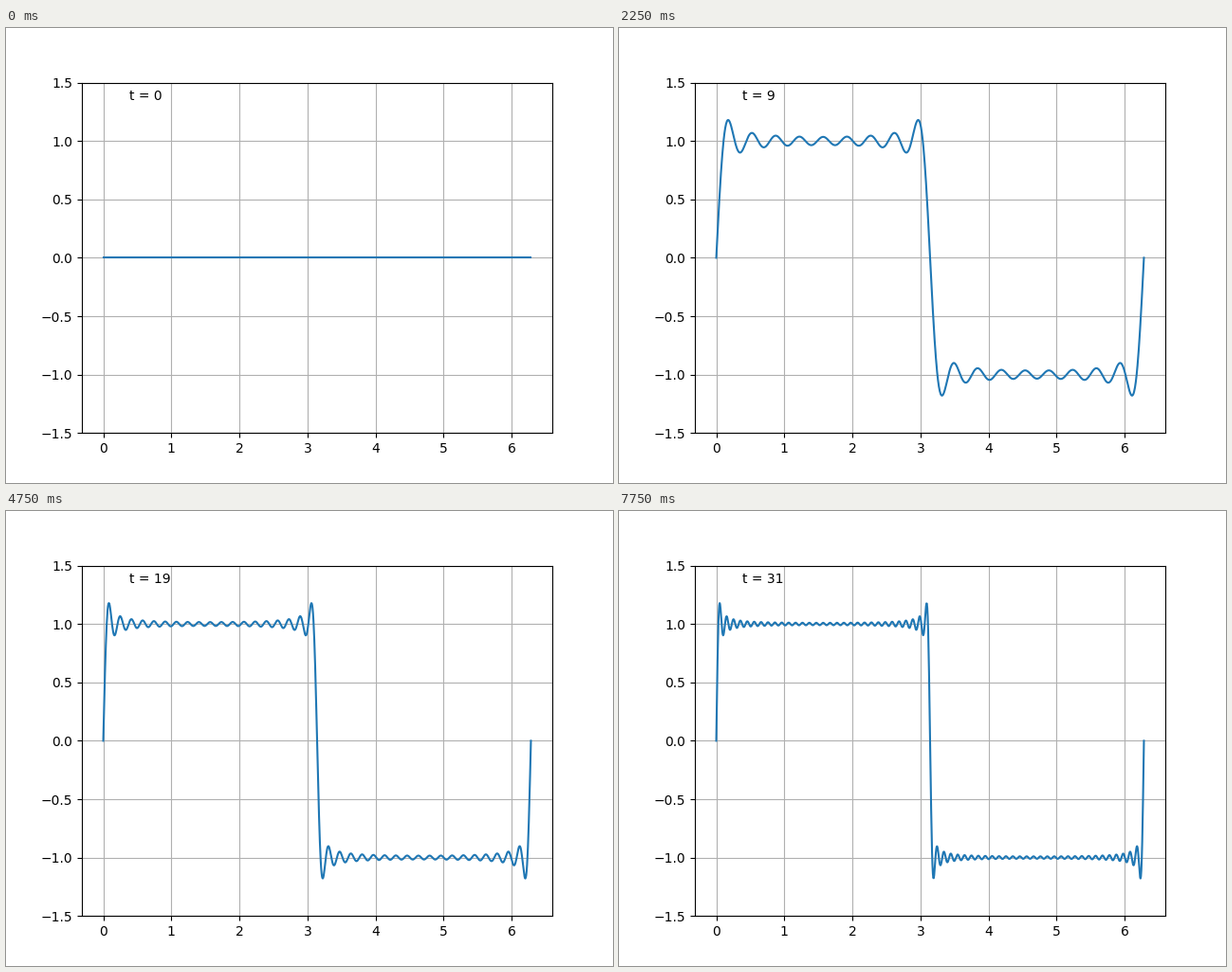
Write a matplotlib script that moves like this. It is 640 px wide and 480 px high and loops after 8000 ms.

```python
import numpy as np
import matplotlib.pyplot as plt
from matplotlib.animation import FuncAnimation

FRAMES = 32
INTERVAL = 250

x = np.linspace(0, 2 * np.pi, 1000)


def square_wave(terms):
    """Partial Fourier sum of a square wave with the given number of terms."""
    y = np.zeros_like(x)
    for k in range(1, 2 * terms, 2):
        y += 4 / np.pi * np.sin(k * x) / k
    return y


fig, ax = plt.subplots(figsize=(6.4, 4.8), dpi=100)
line, = ax.plot(x, square_wave(0))
label = ax.text(0.1, 0.95, "", transform=ax.transAxes)
ax.set_ylim(-1.5, 1.5)
ax.grid()


def update(t):
    line.set_ydata(square_wave(t))
    label.set_text(f"t = {t}")
    return line, label


anim = FuncAnimation(fig, update, frames=FRAMES, interval=INTERVAL,
                     init_func=lambda: update(0), repeat=True, repeat_delay=0)
plt.show()
```
